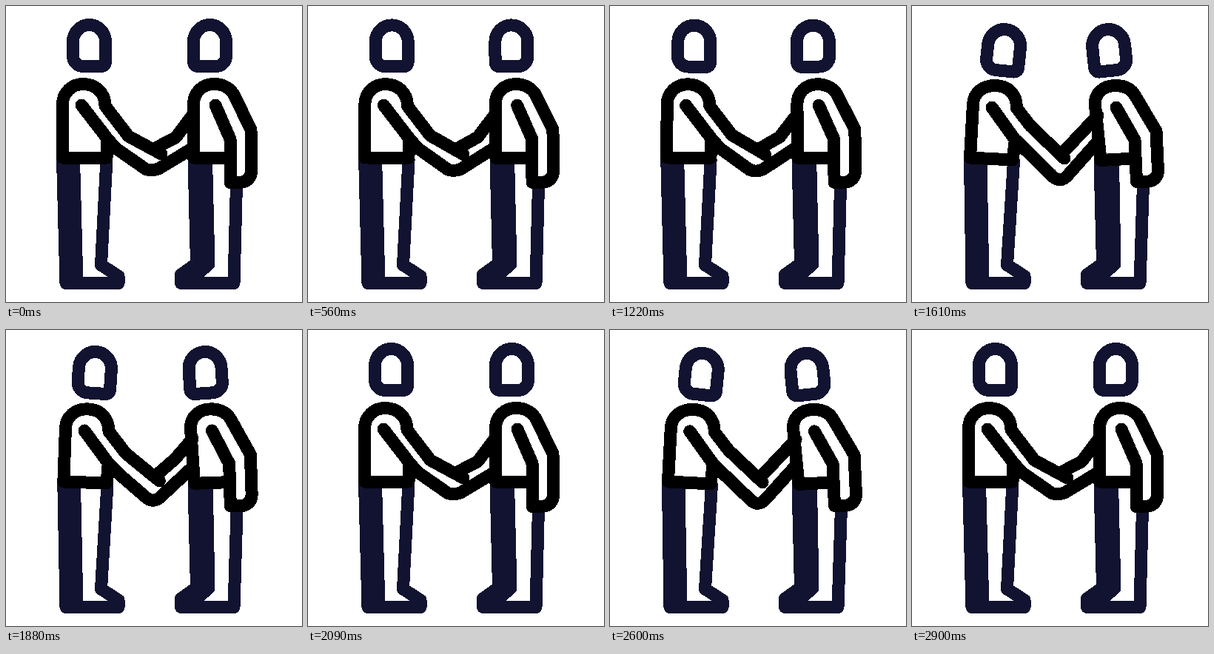
Animation, 400 px wide and 400 px high, one loop 2.93 s. Source, as an HTML page:

```html
<!DOCTYPE html>
<html lang="en">
<head>
<meta charset="utf-8">
<title>Handshake</title>
<style>
  html, body { margin: 0; width: 100%; height: 100%; overflow: hidden; background: #fff; }
  svg { display: block; width: 100vw; height: 100vh; }
  path {
    fill: none; stroke-width: 17; stroke-linecap: round; stroke-linejoin: round;
    shape-rendering: crispEdges;
  }
  .navy { stroke: #121331; }
  .solid { fill: #121331; }
  .black { stroke: #000; }
</style>
</head>
<body>
<svg id="stage" viewBox="0 0 400 400"></svg>
<script>
const LOOP = 2930, HOLD = 530, STEP = 30, STEPS = 80, SHAKES = 3;
const REACH = 0.88; // share of the swing at which the second pose is met

// class, upright pose, leaning pose
const parts = [
  // left legs
  ['navy solid',
    'M76.5 207 L81 374.5 L96 374.5 L91.5 207 Z',
    'M78.5 208 L81 374.5 L96 374.5 L93 209 Z'],
  ['navy',
    'M136 207 L128.5 350 L152 365 L152 374.5 L81 374.5',
    'M137.5 210 L128.5 350 L152 365 L152 374.5 L81 374.5'],
  // right legs
  ['navy solid',
    'M254 207 L257.5 348 L236.5 363 L236.5 374.5 L244 374.5 L274 349 L270.5 207 Z',
    'M254 210 L257.5 348 L236.5 363 L236.5 374.5 L244 374.5 L274 349 L271.5 209 Z'],
  ['navy',
    'M311.5 240 L308 374.5 L240 374.5',
    'M312.5 240 L308 374.5 L240 374.5'],
  // clasped arms
  ['black',
    'M254 145 L229.5 177.5 L203 191.5',
    'M251 148 L228 172.5 L204 198'],
  ['black',
    'M136 178 L148 192 L189 220.5 C193 222 200 222 206 220 L250 193.5',
    'M140 181 L154 195 L188 228 C193 234 202 240 212 227 L252 182'],
  // left torso and upper arm
  ['black',
    'M102 134 L136 178 L136 205 L76.5 205 L76.5 133 C76.5 117 89 105.5 104 105.5 C120 105.5 134 116 134 135 L165.5 176 L210 200',
    'M108 137 L139.5 181 L136 208 L78.5 205 L82.5 133 C83 117 96 107.5 112 107.5 C130 107.5 141.5 119 141.5 138 L160 162 L206 206'],
  // right torso and hanging arm
  ['black',
    'M303 205 L253.5 205 L253.5 133 C253.5 117 265 105.5 281 105.5 C293 105.5 304 111 309 122 L331 167 L331.5 222 C331.5 232 326 238 316 238.5 L303 238.5 L303 180 L283 134',
    'M300 206 L255 208.5 L247.5 134 C246 118 259 107.5 275 107.5 C287 107.5 297 112 302 122 L330 169 L332.5 222 C332.5 231 327 237 317 237.5 L303.5 237.5 L301 181 L276 137']
];

const HEAD = 'M16 28 H-8 A14 14 0 0 1 -22 14 V-5.5 A22 22.5 0 0 1 22 -5.5 V22 A6 6 0 0 1 16 28 Z';
// centre, side the face points to, shift and turn when leaning
const heads = [
  { x: 112.5, y: 53.5, side: 1, dx: 11.5, dy: 6, turn: 6 },
  { x: 275.5, y: 53.5, side: -1, dx: 9.3, dy: 6, turn: 6 }
];

const stage = document.getElementById('stage');

function addPath(cls, d) {
  const el = document.createElementNS('http://www.w3.org/2000/svg', 'path');
  el.setAttribute('class', cls);
  el.setAttribute('d', d);
  return stage.appendChild(el);
}

const numbers = d => d.match(/-?\d+(\.\d+)?/g).map(Number);

const shapes = parts.map(([cls, from, to]) => {
  const a = numbers(from), b = numbers(to);
  return { el: addPath(cls, from), from, a, b };
});
heads.forEach(h => { h.el = addPath('navy', HEAD); });

function pose(q) {
  for (const s of shapes) {
    let i = 0;
    s.el.setAttribute('d', s.from.replace(/-?\d+(\.\d+)?/g, () => {
      const v = s.a[i] + (s.b[i] - s.a[i]) * q;
      i++;
      return v.toFixed(2);
    }));
  }
  for (const h of heads) {
    const x = h.x + h.side * h.dx * q, y = h.y + h.dy * q;
    h.el.setAttribute('transform',
      `translate(${x} ${y}) scale(${h.side} 1) rotate(${h.turn * q})`);
  }
}

const start = performance.now();

function draw() {
  const t = (performance.now() - start) % LOOP;
  const k = t < HOLD ? 0 : Math.floor((t - HOLD) / STEP) + 1;
  const swing = (1 - Math.cos(2 * Math.PI * SHAKES * k / STEPS)) / 2;
  pose(swing / REACH);
  requestAnimationFrame(draw);
}
draw();
</script>
</body>
</html>
```
